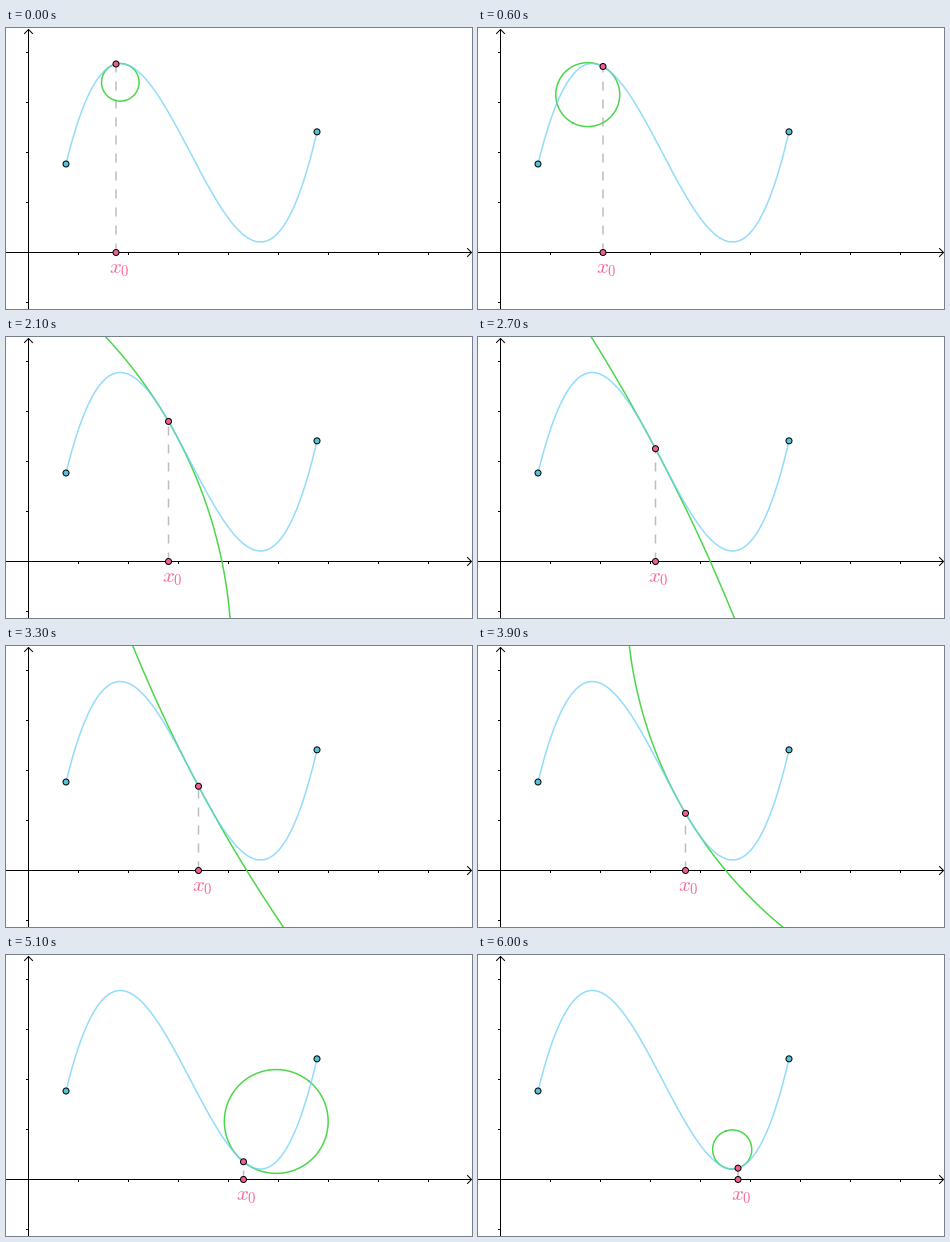
Animation of 466 by 281 pixels, one loop 6.3 s. Source, as a matplotlib script:

```python
import numpy as np
import matplotlib.pyplot as plt
from matplotlib.animation import FuncAnimation

W, H, DPI = 466, 281, 100
PX = 72 / DPI  # one pixel in points
FRAMES, INTERVAL = 21, 300

OX, OY, UNIT = 22.5, 224.5, 50
MID_X, MID_Y = 184.35, 124.75  # inflection point
HALF_W, HALF_H = 70.15, 89.25  # distance from there to the extrema
X_MIN, X_MAX = 60, 311

BLUE, GREEN, PINK = "#6fd0fa", "#4bd64b", "#fb6a9f"
DOT_BLUE, DOT_PINK = "#55c2da", "#f0608f"

plt.rcParams["mathtext.fontset"] = "cm"


def curve(x):
    u = (x - MID_X) / HALF_W
    return MID_Y + HALF_H * (3 * u - u**3) / 2


def slope(x):
    u = (x - MID_X) / HALF_W
    return 1.5 * HALF_H / HALF_W * (1 - u**2)


def bend(x):
    return -3 * HALF_H / HALF_W**3 * (x - MID_X)


def osculating_circle(x):
    """Points of the circle of curvature, limited to the part near the stage."""
    d = slope(x)
    norm = np.hypot(1, d)
    r = norm**3 / bend(x)
    reach = min(np.pi, 700 / abs(r))
    a = np.linspace(-reach, reach, 500)
    along, across = r * np.sin(a), 2 * r * np.sin(a / 2) ** 2
    return x + (along - d * across) / norm, curve(x) + (d * along + across) / norm


fig = plt.figure(figsize=(W / DPI, H / DPI), dpi=DPI, facecolor="white")
ax = fig.add_axes([0, 0, 1, 1])
ax.set_xlim(0, W)
ax.set_ylim(H, 0)
ax.axis("off")


def stroke(xs, ys, color="black", width=1, z=1, **kw):
    return ax.plot(xs, ys, color=color, lw=width * PX, zorder=z,
                   snap=False, **kw)[0]


def dot(x, y, color):
    return ax.add_patch(plt.Circle((x, y), 3, fc=color, ec="black",
                                   lw=PX, zorder=6, snap=False))


# coordinate axes
butt = dict(solid_capstyle="butt")
stroke([0, W - 0.5], [OY, OY], **butt)
stroke([OX, OX], [1.5, H], **butt)
stroke([W - 4.5, W - 0.5, W - 4.5], [OY - 4, OY, OY + 4])
stroke([OX - 4, OX, OX + 4], [5.5, 1.5, 5.5])
for k in range(1, 9):
    stroke([OX + k * UNIT] * 2, [OY, OY + 2.5], **butt)
for k in (-1, 1, 2, 3, 4):
    stroke([OX - 2.5, OX], [OY - k * UNIT] * 2, **butt)

xs = np.linspace(X_MIN, X_MAX, 400)
stroke(xs, curve(xs), BLUE, 1.5, 4, alpha=0.75)
for x in (X_MIN, X_MAX):
    dot(x, curve(x), DOT_BLUE)

circle = stroke([], [], GREEN, 1.5, 3)
drop = stroke([], [], "#bdbdbd", 1.5, 2, dashes=(6, 6), dash_capstyle="butt")
foot = dot(0, OY, DOT_PINK)
touch = dot(0, 0, DOT_PINK)
label = ax.text(0, 245, "$x_0$", color=PINK, fontsize=21 * PX,
                ha="left", va="baseline", zorder=5)


def update(i):
    x = OX + UNIT * (1.75 + 0.15 * i)
    y = curve(x)
    circle.set_data(*osculating_circle(x))
    drop.set_data([x, x], [OY, y])
    foot.center = x, OY
    touch.center = x, y
    label.set_x(x - 7)
    return circle, drop, foot, touch, label


anim = FuncAnimation(fig, update, frames=FRAMES, interval=INTERVAL,
                     repeat=True, repeat_delay=0, blit=False)
plt.show()
```
